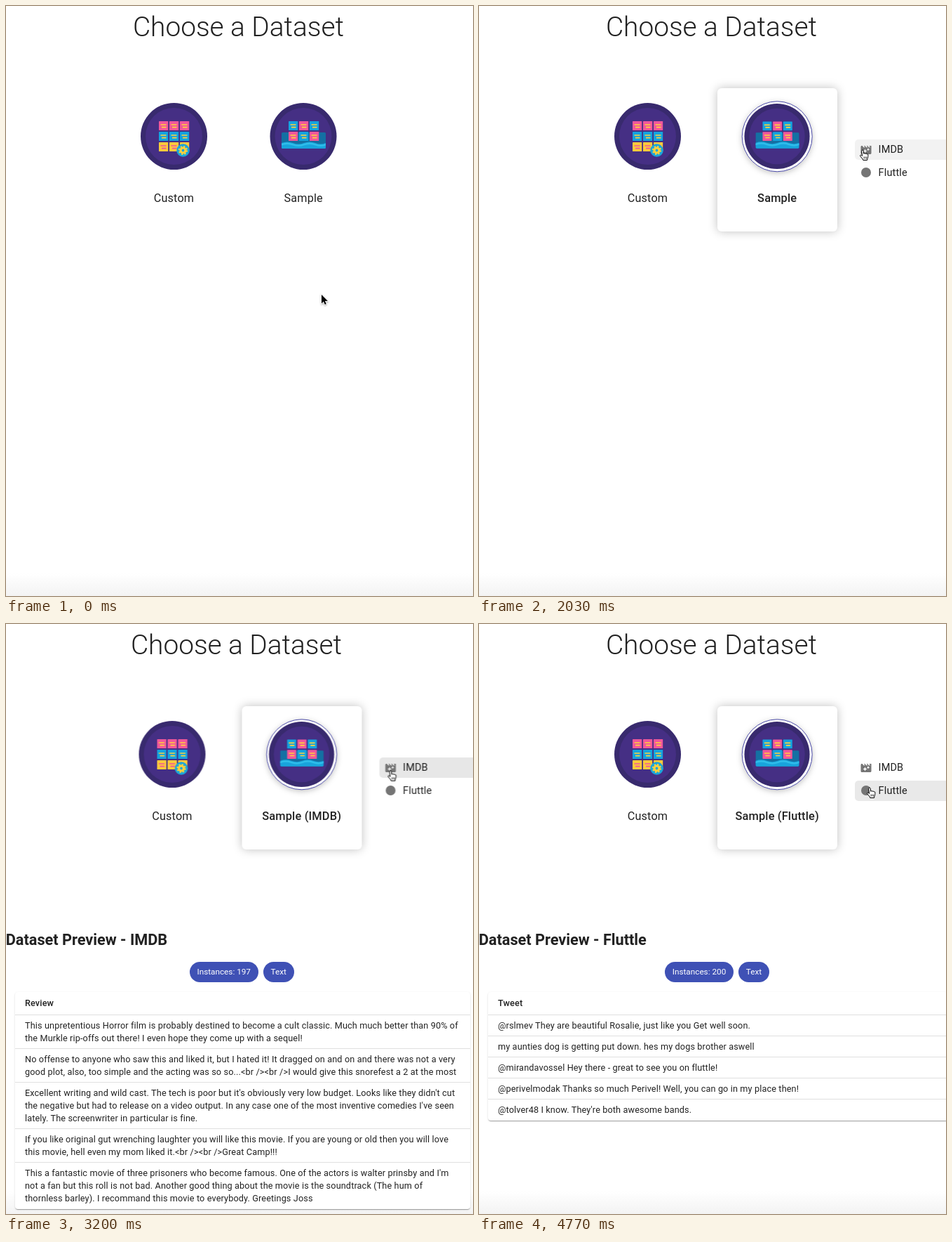
An HTML page for the animation above (4810 ms loop, 666 by 840 pixels).

```html
<!DOCTYPE html>
<html lang="en">
<head>
<meta charset="utf-8">
<title>Choose a Dataset</title>
<style>
  :root {
    --loop: 4810ms;
    --ease: cubic-bezier(.4, 0, .2, 1);
  }
  html, body {
    margin: 0;
    width: 100%;
    height: 100%;
    overflow: hidden;
    background: #fff;
  }
  body {
    position: relative;
    font: 400 12.67px/18px Roboto, sans-serif;
    color: rgba(0, 0, 0, .87);
    white-space: nowrap;
  }
  svg { position: absolute; left: 0; top: 0; overflow: visible; }

  .footer {
    position: absolute;
    inset: 808px 0 0;
    background: linear-gradient(#fff, #f3f3f3);
  }
  h1 {
    position: absolute;
    left: 0;
    top: 4px;
    width: 663px;
    margin: 0;
    text-align: center;
    font-weight: 300;
    font-size: 38.8px;
    line-height: 52px;
    animation: title-shift var(--loop) step-end infinite;
  }

  /* dataset choices */
  .choices {
    position: absolute;
    inset: 0;
    animation: grid-shift var(--loop) step-end infinite;
  }
  .card {
    position: absolute;
    left: 340px;
    top: 116.7px;
    width: 170.5px;
    height: 204.3px;
    border-radius: 6px;
    background: #fff;
    box-shadow: 0 0 14px rgba(0, 0, 0, .25);
    animation: card var(--loop) linear infinite;
  }
  .ring { animation: card var(--loop) linear infinite; }
  .ring circle:first-child { filter: drop-shadow(0 2px 4px rgba(0, 0, 0, .25)); }
  .sample-icon {
    transform-origin: 425px 185.5px;
    animation: sample-icon var(--loop) step-end infinite;
  }
  .label {
    position: absolute;
    top: 262px;
    width: 180px;
    text-align: center;
    font-size: 16.2px;
    line-height: 24px;
    letter-spacing: .0094em;
  }
  .custom { left: 150.5px; }
  .sample { left: 335.2px; font-weight: 500; font-size: 16.4px; }
  .sample.plain { font-weight: 400; font-size: 16.2px; }

  .item {
    position: absolute;
    left: 536px;
    width: 150px;
    height: 29px;
    border-radius: 5px;
    overflow: hidden;
    font-size: 14.5px;
    line-height: 29px;
    letter-spacing: .0094em;
  }
  .item b { position: absolute; left: 33.6px; font-weight: 400; }
  .item svg { left: 7px; top: 5.5px; fill: #757575; }
  .menu { animation: card var(--loop) linear infinite; }
  .first { top: 190px; animation: first-bg var(--loop) linear infinite; }
  .second { top: 222.7px; animation: second-bg var(--loop) linear infinite; }
  .ripple {
    position: absolute;
    width: 214px;
    height: 214px;
    margin: -107px;
    border-radius: 50%;
    background: #000;
    opacity: 0;
    animation: ripple-grow var(--loop) var(--ease) infinite, ripple-fade var(--loop) linear infinite;
  }
  .first .ripple { left: 11px; top: 15px; }
  .second .ripple { left: 24.5px; top: 13px; animation-delay: 1665ms; }

  /* preview */
  .preview { position: absolute; inset: 0; opacity: 0; }
  .grow {
    transform-origin: 331px 651px;
    animation: grow var(--loop) var(--ease) infinite, fade var(--loop) var(--ease) infinite;
  }
  h2 {
    position: absolute;
    left: -.3px;
    top: 434px;
    margin: 0;
    font-weight: 700;
    font-size: 21.7px;
    line-height: 32px;
  }
  .chips {
    position: absolute;
    left: 0;
    top: 480.7px;
    width: 672.4px;
    display: flex;
    justify-content: center;
    gap: 7px;
  }
  .chips span {
    padding: 0 10.8px;
    border-radius: 15px;
    background: #3f51b5;
    color: #fff;
    font-size: 11.75px;
    line-height: 29px;
  }
  .table {
    position: absolute;
    left: 12.6px;
    top: 524px;
    width: 649px;
    border-radius: 4px;
    background: #fff;
    box-shadow: 0 2px 1px -1px rgba(0, 0, 0, .2), 0 1px 1px rgba(0, 0, 0, .14), 0 1px 3px rgba(0, 0, 0, .12);
    letter-spacing: .01071em;
  }
  .table div { padding: 5.5px 14.4px; border-bottom: 1px solid #e0e0e0; }
  .table .head { padding: 7px 14.4px; font-weight: 500; }
  .table div:last-child { border-color: transparent; }
  .wide .chips { width: 679px; }
  .wide .table { width: 656px; }

  /* which state is on show */
  .s0 { animation: s0 var(--loop) step-end infinite; }
  .s1 { animation: s1 var(--loop) step-end infinite; }
  .s2 { animation: s2 var(--loop) step-end infinite; }
  .s3 { animation: s3 var(--loop) step-end infinite; }
  @keyframes s0 { 0% { opacity: 1 } 12.89%, 100% { opacity: 0 } }
  @keyframes s1 { 0% { opacity: 0 } 12.89% { opacity: 1 } 44.7%, 100% { opacity: 0 } }
  @keyframes s2 { 0% { opacity: 0 } 44.7% { opacity: 1 } 79.42%, 100% { opacity: 0 } }
  @keyframes s3 { 0% { opacity: 0 } 79.42%, 100% { opacity: 1 } }

  @keyframes title-shift {
    0%, 79.42%, 100% { transform: none }
    44.7% { transform: translateX(-3px) }
  }
  @keyframes grid-shift {
    0% { transform: translateX(-1px) }
    12.89%, 79.42%, 100% { transform: none }
    44.7% { transform: translateX(-3.5px) }
  }
  @keyframes card { 0%, 12.89% { opacity: 0 } 15%, 100% { opacity: 1 } }
  @keyframes sample-icon {
    0% { transform: none }
    12.89%, 100% { transform: scale(.98) }
  }
  @keyframes first-bg {
    0%, 36.07% { background: rgba(0, 0, 0, 0) }
    38%, 44.7% { background: rgba(0, 0, 0, .05) }
    48%, 69.4% { background: rgba(0, 0, 0, .095) }
    71%, 79.41% { background: rgba(0, 0, 0, .08) }
    79.42%, 100% { background: rgba(0, 0, 0, 0) }
  }
  @keyframes second-bg {
    0%, 69.6% { background: rgba(0, 0, 0, 0) }
    71.5%, 79.42% { background: rgba(0, 0, 0, .045) }
    82%, 100% { background: rgba(0, 0, 0, .085) }
  }
  @keyframes ripple-grow {
    0%, 43.04% { transform: scale(0) }
    50.19%, 100% { transform: scale(1) }
  }
  @keyframes ripple-fade {
    0%, 43% { opacity: 0 }
    43.04% { opacity: .1 }
    44.7%, 46.4% { opacity: .15 }
    51.85%, 100% { opacity: 0 }
  }
  @keyframes grow {
    0%, 44.7% { transform: scale(.75, .5625) }
    47.6%, 100% { transform: none }
  }
  @keyframes fade {
    0%, 44.7% { opacity: 0 }
    49.06%, 79.41% { opacity: 1 }
    79.42%, 100% { opacity: 0 }
  }

  /* pointer */
  .pointer { animation: pointer var(--loop) ease-in-out infinite; }
  .arrow { animation: arrow var(--loop) step-end infinite; }
  .hand { animation: hand var(--loop) step-end infinite; }
  @keyframes pointer {
    0%, .8% { transform: translate(450px, 411px) }
    10.4%, 27.03% { transform: translate(425.5px, 207px) }
    38.46%, 64.03% { transform: translate(547px, 205px) }
    74.01%, 100% { transform: translate(557px, 233px) }
  }
  @keyframes arrow {
    0%, 34.2% { opacity: 1 }
    5.3%, 36.07%, 100% { opacity: 0 }
  }
  @keyframes hand {
    0%, 34.2% { opacity: 0 }
    5.3%, 36.07%, 100% { opacity: 1 }
  }
</style>
</head>
<body>
<div class="footer"></div>
<h1>Choose a Dataset</h1>

<div class="choices">
  <div class="card"></div>
  <svg width="666" height="840">
    <defs>
      <g id="disc">
        <circle r="47.5" fill="#382a6e"/>
        <circle r="40.5" fill="#452f84"/>
      </g>
      <g id="cell">
        <rect width="13.2" height="13" rx=".6"/>
        <path d="M2.5 5h8M4 8.6h6.5" stroke="currentColor" stroke-width="1.6"/>
      </g>
      <g id="cells">
        <use href="#cell"/>
        <use href="#cell" x="15"/>
        <use href="#cell" x="30"/>
      </g>
    </defs>

    <use href="#disc" x="240.5" y="185.5"/>
    <g color="#ffd23c">
      <use href="#cells" x="219" y="164" fill="#f0579b"/>
      <use href="#cells" x="219" y="179" fill="#14a3df"/>
    </g>
    <use href="#cells" x="219" y="194" fill="#fdca3b" color="#f0579b"/>
    <g transform="translate(253.5 205.5)" fill="none">
      <circle r="9.3" fill="#1aa6da"/>
      <circle r="5.6" stroke="#ffd23c" stroke-width="2" stroke-dasharray="2.2 2.2"/>
      <circle r="3.5" stroke="#ffd23c" stroke-width="3.2"/>
    </g>

    <g class="ring">
      <circle cx="425.2" cy="185.8" r="50" fill="#fff"/>
      <circle cx="425.2" cy="185.8" r="50" fill="#fff" stroke="#4a4aa8"/>
    </g>
    <g class="sample-icon">
      <use href="#disc" x="425" y="185.5"/>
      <rect x="394" y="180" width="63" height="23" rx="1.5" fill="#1470a3"/>
      <g color="#ffd23c">
        <g fill="#14a3df">
          <use href="#cell" x="404" y="164"/>
          <use href="#cell" x="434" y="164"/>
          <use href="#cell" x="419" y="179"/>
        </g>
        <g fill="#f0579b">
          <use href="#cell" x="419" y="164"/>
          <use href="#cell" x="404" y="179"/>
          <use href="#cell" x="434" y="179"/>
        </g>
      </g>
      <path d="M394 195q8-3 16 0t16 0 16 0 15 0v6.5q0 1.5-1.5 1.5h-60q-1.5 0-1.5-1.5z" fill="#18a4dc"/>
      <path d="M394 196q8-3 16 0t16 0 16 0 15 0v2.5q-7 3-15 0t-16 0-16 0-16 0z" fill="#2fbdea"/>
    </g>
  </svg>

  <div class="label custom">Custom</div>
  <div class="label sample plain s0">Sample</div>
  <div class="label sample s1">Sample</div>
  <div class="label sample s2">Sample (IMDB)</div>
  <div class="label sample s3">Sample (Fluttle)</div>

  <div class="menu">
    <div class="item first">
      <svg width="18" height="18" viewBox="0 0 24 24"><path d="M18 4l2 3h-3l-2-3h-2l2 3h-3l-2-3H8l2 3H7L5 4H4c-1.1 0-2 .9-2 2v12c0 1.1.9 2 2 2h16c1.1 0 2-.9 2-2V4zm-6.75 11.25L10 18l-1.25-2.75L6 14l2.75-1.25L10 10l1.25 2.75L14 14zm5.69-3.31L16 14l-.94-2.06L13 11l2.06-.94L16 8l.94 2.06L19 11z"/></svg>
      <b>IMDB</b>
      <i class="ripple"></i>
    </div>
    <div class="item second">
      <svg width="18" height="18"><circle cx="9" cy="9" r="7"/></svg>
      <b>Fluttle</b>
      <i class="ripple"></i>
    </div>
  </div>
</div>

<div class="preview grow">
  <h2>Dataset Preview - IMDB</h2>
  <div class="chips"><span>Instances: 197</span><span>Text</span></div>
  <div class="table">
    <div class="head">Review</div>
    <div>This unpretentious Horror film is probably destined to become a cult classic. Much much better than 90% of<br>the Murkle rip-offs out there! I even hope they come up with a sequel!</div>
    <div>No offense to anyone who saw this and liked it, but I hated it! It dragged on and on and there was not a very<br>good plot, also, too simple and the acting was so so...&lt;br /&gt;&lt;br /&gt;I would give this snorefest a 2 at the most</div>
    <div>Excellent writing and wild cast. The tech is poor but it's obviously very low budget. Looks like they didn't cut<br>the negative but had to release on a video output. In any case one of the most inventive comedies I've seen<br>lately. The screenwriter in particular is fine.</div>
    <div>If you like original gut wrenching laughter you will like this movie. If you are young or old then you will love<br>this movie, hell even my mom liked it.&lt;br /&gt;&lt;br /&gt;Great Camp!!!</div>
    <div>This a fantastic movie of three prisoners who become famous. One of the actors is walter prinsby and I'm<br>not a fan but this roll is not bad. Another good thing about the movie is the soundtrack (The hum of<br>thornless barley). I recommand this movie to everybody. Greetings Joss</div>
  </div>
</div>

<div class="preview wide s3">
  <h2>Dataset Preview - Fluttle</h2>
  <div class="chips"><span>Instances: 200</span><span>Text</span></div>
  <div class="table">
    <div class="head">Tweet</div>
    <div>@rslmev They are beautiful Rosalie, just like you Get well soon.</div>
    <div>my aunties dog is getting put down. hes my dogs brother aswell</div>
    <div>@mirandavossel Hey there - great to see you on fluttle!</div>
    <div>@perivelmodak Thanks so much Perivel! Well, you can go in my place then!</div>
    <div>@tolver48 I know. They're both awesome bands.</div>
  </div>
</div>

<svg width="666" height="840">
  <g class="pointer">
    <path class="arrow" d="M0 0v12.5l2.9-2.8 1.9 4.4 2-.9-1.9-4.2h4z" stroke="#fff" stroke-width="1.6" paint-order="stroke" style="filter: drop-shadow(0 1px 1px rgba(0, 0, 0, .35))"/>
    <g class="hand" stroke="#000">
      <g transform="translate(-4.5 -1)">
        <path d="M3.2 2.3c0-1.6 2.3-1.6 2.5 0l.6 4c.3-.9 2-.9 2.2.2.4-.8 1.9-.6 2 .5.5-.6 1.9-.3 1.9.9 0 2.5-.2 3.6-1 5.2l-.3 2.4H5.3L4.8 14 1.3 9.9c-.9-1.2.5-2.4 1.7-1.3l1 .9z" fill="#fff"/>
        <path d="M6.5 10.5v3M8.3 10.5v3M10 10.5v3" stroke-width=".7"/>
      </g>
    </g>
  </g>
</svg>
</body>
</html>
```
